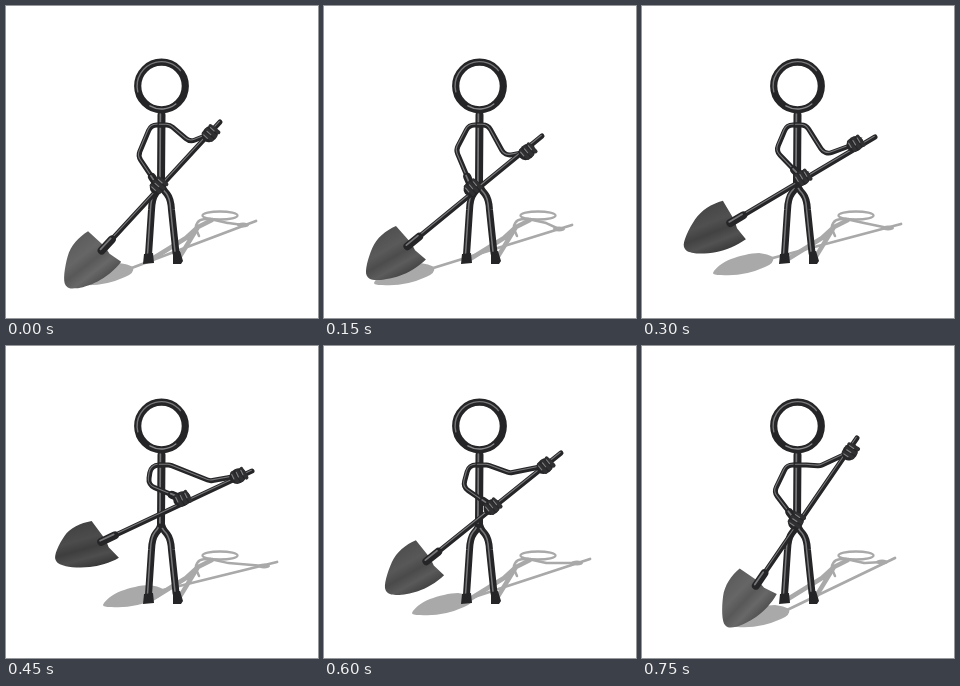
An HTML page with a canvas for the animation above (900 ms loop, 312 by 312 pixels).

```html
<!DOCTYPE html>
<html lang="en">
<head>
<meta charset="utf-8">
<title>Stick figure digging</title>
<style>
  html, body { margin: 0; width: 100%; height: 100%; overflow: hidden; background: #fff; }
  canvas { display: block; width: 312px; height: 312px; }
</style>
</head>
<body>
<canvas id="stage" width="312" height="312"></canvas>
<script>
const ctx = document.getElementById('stage').getContext('2d');
const STEP = 150;
const SHADOW = '#a9a9a9';
const BODY = '#252527';
const SHINE = '#77777a';

// grip: handle end, neck: where the blade starts, tone: blade lightness
const poses = [
  { grip: [214, 116], neck: [97, 243], stretch: .98, skew: 0, tone: 98,
    high: [204, 128], low: [152, 180], elbowL: [132, 150], elbowR: [184, 136],
    shadeTip: [67, 277], shadeGrip: [250, 215] },
  { grip: [218, 130], neck: [85, 239], stretch: .98, skew: .04, tone: 86,
    high: [203, 146], low: [148, 182], elbowL: [132, 144], elbowR: [181, 150],
    shadeTip: [50, 277], shadeGrip: [248, 219] },
  { grip: [233, 131], neck: [90, 216], stretch: 1.02, skew: 0, tone: 76,
    high: [213, 138], low: [160, 172], elbowL: [134, 145], elbowR: [183, 149],
    shadeTip: [71, 267], shadeGrip: [259, 218] },
  { grip: [246, 125], neck: [97, 195], stretch: .95, skew: .2, tone: 72,
    high: [232, 130], low: [176, 153], elbowL: [142, 139], elbowR: [204, 135],
    shadeTip: [97, 259], shadeGrip: [271, 216] },
  { grip: [237, 107], neck: [104, 214], stretch: .98, skew: 0, tone: 84,
    high: [221, 120], low: [168, 161], elbowL: [139, 141], elbowR: [186, 127],
    shadeTip: [88, 267], shadeGrip: [266, 213] },
  { grip: [215, 92], neck: [115, 238], stretch: .98, skew: 0, tone: 98,
    high: [208, 106], low: [154, 175], elbowL: [132, 146], elbowR: [178, 120],
    shadeTip: [87, 279], shadeGrip: [253, 212] },
];

const gray = v => `rgb(${v},${v},${v})`;
const mix = (a, b, t) => a.map((v, i) => v + (b[i] - v) * t);

function stroke(path, width, color) {
  ctx.lineWidth = width;
  ctx.strokeStyle = color;
  ctx.lineCap = ctx.lineJoin = 'round';
  ctx.stroke(path);
}

function tube(path, width) {
  stroke(path, width, BODY);
  ctx.save();
  ctx.translate(-width * .14, -width * .14);
  stroke(path, width * .22, SHINE);
  ctx.restore();
}

function line(...points) {
  const path = new Path2D();
  points.forEach(p => path.lineTo(...p));
  return path;
}

// A limb through its joints, with every bend rounded
function limb(radius, start, ...joints) {
  const path = new Path2D();
  path.moveTo(...start);
  joints.slice(0, -1).forEach((p, i) => path.arcTo(...p, ...joints[i + 1], radius));
  path.lineTo(...joints.at(-1));
  return path;
}

function ring(x, y, rx, ry) {
  const path = new Path2D();
  path.ellipse(x, y, rx, ry, 0, 0, 2 * Math.PI);
  return path;
}

function blob(x, y, rx, ry, color) {
  ctx.fillStyle = color;
  ctx.fill(ring(x, y, rx, ry));
}

const leftLeg = new Path2D('M155 176Q155 182 150 187Q146 192 145.5 204L142.5 249');
const rightLeg = new Path2D('M155 176Q156 183 161 188Q165 193 165.5 204L170 247');
const feet = new Path2D('M138 248L147 247L148 257L137 258ZM167 246L174 245L177 255L175 258L167 258Z');
const bladeShape = new Path2D('M-3 23C8 26 20 26 30 21S52 8 53 3S51 -4 48 -7S36 -15 28 -18S8 -23 -3 -22L-1 -8L-3 0Z');
const bladeShadow = new Path2D('M0 0C2 -5 10 -11 18 -14S38 -20 46 -20Q55 -19 60 -16Q62 -10 52 -6Q30 4 8 2Q0 2 0 0Z');
const legShadow = new Path2D('M146 253L180 232L192 221L206 214M173 252L181 239L192 221');

function drawShadow({ shadeTip: [x, y], shadeGrip }) {
  const hand = [shadeGrip[0] - 13, shadeGrip[1] + 4];
  ctx.save();
  ctx.translate(x, y);
  ctx.fillStyle = SHADOW;
  ctx.fill(bladeShadow);
  ctx.restore();
  stroke(line([x + 56, y - 14], shadeGrip), 2.8, SHADOW);
  stroke(legShadow, 4.5, SHADOW);
  stroke(limb(8, [204, 213], [222, 217], hand), 2.5, SHADOW);
  stroke(limb(8, [204, 213], [186, 214], [193, 230]), 2.5, SHADOW);
  blob(...hand, 6, 2.5, SHADOW);
  stroke(ring(214, 209.5, 17.5, 4), 2.3, SHADOW);
}

function drawHead() {
  stroke(ring(155.5, 80, 23.8, 23.8), 7.2, BODY);
  const shine = new Path2D();
  shine.arc(155.5, 80, 24.4, 2.9, 5.6);
  stroke(shine, 1.4, SHINE);
  const glint = new Path2D();
  glint.arc(155.5, 80, 23, .9, 2.1);
  stroke(glint, 1.4, '#88888a');
}

function drawHand([x, y], angle) {
  ctx.save();
  ctx.translate(x, y);
  ctx.rotate(angle);
  blob(0, 0, 9, 7.5, BODY);
  for (const dx of [-4, 1, 6]) {
    stroke(line([dx, -5], [dx + 1, 5]), 4, '#303032');
    stroke(line([dx - 1, -4], [dx - 1, 1]), 1.1, '#808082');
  }
  ctx.restore();
}

function drawBlade({ neck, stretch, skew, tone }, angle) {
  ctx.save();
  ctx.translate(...neck);
  ctx.rotate(angle);
  ctx.transform(stretch, 0, skew, 1, 0, 0);
  const shade = ctx.createLinearGradient(0, 25, 8, -24);
  shade.addColorStop(0, gray(tone - 6));
  shade.addColorStop(.35, gray(tone + 4));
  shade.addColorStop(.55, gray(tone - 10));
  shade.addColorStop(.75, gray(tone + 6));
  shade.addColorStop(1, gray(tone - 20));
  ctx.fillStyle = shade;
  ctx.fill(bladeShape);
  ctx.restore();
}

function drawPose(pose) {
  const { grip, neck, high, low, elbowL, elbowR } = pose;
  const angle = Math.atan2(neck[1] - grip[1], neck[0] - grip[0]);
  const along = d => [neck[0] + d * Math.cos(angle), neck[1] + d * Math.sin(angle)];

  ctx.fillStyle = '#fff';
  ctx.fillRect(0, 0, 312, 312);
  drawShadow(pose);
  tube(leftLeg, 7);
  tube(rightLeg, 7);
  ctx.fillStyle = BODY;
  ctx.fill(feet);
  tube(line([155.5, 109], [155, 178]), 8);
  drawHead();
  tube(limb(9, [155, 119], [145, 119], elbowL, low), 5);
  tube(line(mix(elbowL, low, .7), low), 8);
  tube(limb(9, [154, 119], [164, 119], elbowR, high), 5);

  drawBlade(pose, angle);
  tube(line(grip, neck), 5);
  tube(line(along(-13), along(2)), 8);
  drawHand(low, angle + Math.PI);
  drawHand(high, angle + Math.PI);
}

function tick() {
  drawPose(poses[Math.floor(performance.now() / STEP) % poses.length]);
  requestAnimationFrame(tick);
}
tick();
</script>
</body>
</html>
```
